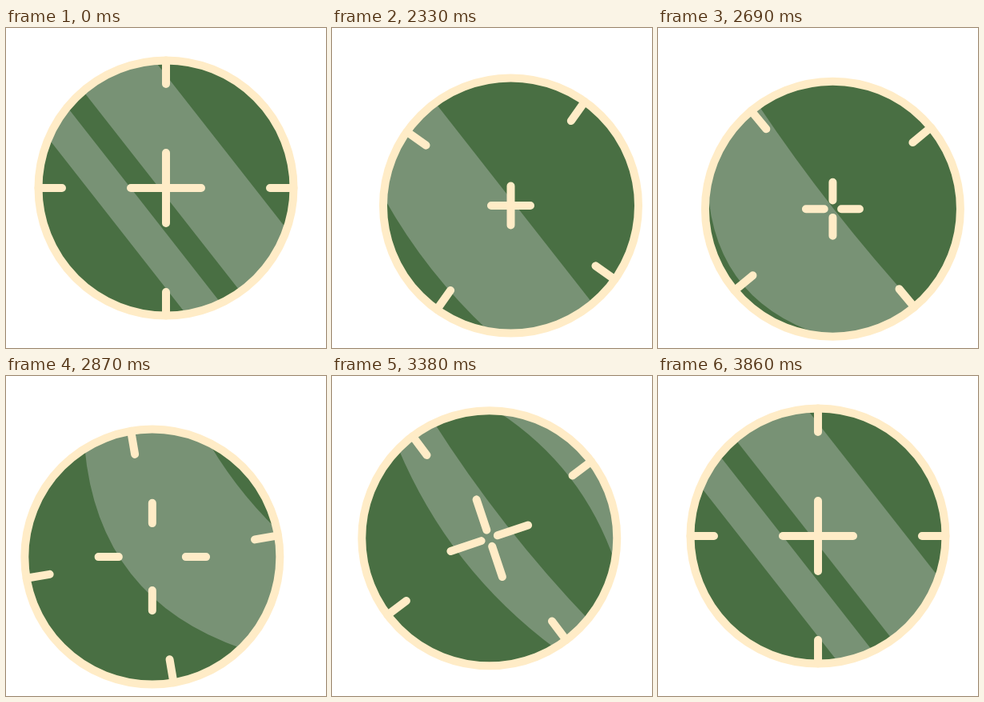
An HTML page that plays this animation: 400x400 px, repeating every 3950 ms.

```html
<!DOCTYPE html>
<html lang="en">
<head>
<meta charset="utf-8">
<title>Scope</title>
<style>
  html, body { margin: 0; width: 100%; height: 100%; overflow: hidden; background: #fff; }
  svg { display: block; width: 100vw; height: 100vh; }
  .line { fill: none; stroke: #ffecc7; stroke-width: 10; stroke-linecap: round; }
  .glass { fill: #496f43; }
  .shine { fill: #789275; }
</style>
</head>
<body>
<svg viewBox="0 0 400 400">
  <clipPath id="lens"><circle r="157"/></clipPath>
  <g id="scope">
    <circle class="glass" r="157"/>
    <g clip-path="url(#lens)">
      <g class="shine" transform="rotate(-38.1)">
        <path id="narrow"/>
        <path id="wide"/>
      </g>
    </g>
    <circle class="line" r="159.5"/>
    <path class="line" id="ticks" d="M0-159.5V-130M0 159.5V130M-159.5 0H-130M159.5 0H130"/>
    <path class="line" id="cross"/>
  </g>
</svg>
<script>
const LOOP = 3950, STEP = 30;
const el = id => document.getElementById(id);
const mix = (a, b, p) => a + (b - a) * p;
const bez = (a, b, c, d, s) => {
  const r = 1 - s;
  return r * r * r * a + 3 * r * r * s * b + 3 * r * s * s * c + s * s * s * d;
};

// cubic-bezier timing, solved by bisection
function ease([x1, y1, x2, y2], x) {
  if (x <= 0) return 0;
  if (x >= 1) return 1;
  let lo = 0, hi = 1;
  for (let i = 0; i < 30; i++) {
    const s = (lo + hi) / 2;
    if (bez(0, x1, x2, 1, s) < x) lo = s; else hi = s;
  }
  return bez(0, y1, y2, 1, lo);
}

// Each leg: x and y of the curved path, tick spin, cross turn, cross inner and outer reach
const legs = [
  { from: 2000, to: 2500, timing: [.167, .167, .45, 1],
    x: [200, 212, 225.1, 223.5], y: [200, 212, 218.3, 224],
    spin: [0, 40], turn: [0, 0], inner: [0, 0], outer: [44, 22] },
  { from: 2500, to: 3000, timing: [.55, 0, .63, 1],
    x: [223.5, 222, 183, 175.5], y: [224, 228.5, 228.5, 224],
    spin: [40, 90], turn: [0, 0], inner: [0, 52], outer: [22, 78] },
  { from: 3000, to: 3870, timing: [.28, 0, .07, 1],
    x: [175.5, 171, 199.7, 200], y: [224, 220, 201.3, 200],
    spin: [90, 270], turn: [0, 90], inner: [52, 0], outer: [78, 44] }
];

// Shine edges: offset at the ends and bulge in the middle, at these times
const times = [2000, 2330, 2690, 2870, 3170, 3380, 3860];
const edges = {
  wideRight:   { at: [87, 5, 7, 164, 240, 230, 87],            bulge: [0, 0, -6, -25, 0, 0, 0] },
  wideLeft:    { at: [-6.7, -108, -72, 18, 150, 89, -6.7],     bulge: [0, -19, -75, -52, 37, 37, 0] },
  narrowRight: { at: [-34.8, -165, -165, -165, 70, 35, -34.8], bulge: [0, 0, 0, 0, -10, -8, 0] },
  narrowLeft:  { at: [-77.5, -200, -200, -200, 0, -20, -77.5], bulge: [0, 0, 0, 0, -25, -22, 0] }
};

// smooth curve through the keys without overshoot
function track(keys, t) {
  const last = times.length - 1;
  if (t <= times[0]) return keys[0];
  if (t >= times[last]) return keys[last];
  const slope = i => (keys[i + 1] - keys[i]) / (times[i + 1] - times[i]);
  const tangent = i => {
    if (i === 0 || i === last) return 0;
    const a = slope(i - 1), b = slope(i);
    return a * b > 0 ? 2 * a * b / (a + b) : 0;
  };
  const i = times.findIndex(k => k > t) - 1;
  const d = times[i + 1] - times[i];
  return bez(keys[i], keys[i] + tangent(i) * d / 3,
             keys[i + 1] - tangent(i + 1) * d / 3, keys[i + 1], (t - times[i]) / d);
}

function band(left, right, t) {
  const [l, lb, r, rb] = [left.at, left.bulge, right.at, right.bulge].map(k => track(k, t));
  return `M${l}-160Q${l + 2 * lb} 0 ${l} 160H${r}Q${r + 2 * rb} 0 ${r}-160Z`;
}

function draw(t) {
  const leg = legs.find(l => t < l.to) || legs[2];
  const p = ease(leg.timing, (t - leg.from) / (leg.to - leg.from));
  const val = name => mix(...leg[name], p);
  const i = val('inner'), o = val('outer');

  el('scope').setAttribute('transform', `translate(${bez(...leg.x, p)} ${bez(...leg.y, p)})`);
  el('ticks').setAttribute('transform', `rotate(${val('spin')})`);
  el('cross').setAttribute('transform', `rotate(${val('turn')})`);
  el('cross').setAttribute('d', `M0 ${-i}V${-o}M0 ${i}V${o}M${-i} 0H${-o}M${i} 0H${o}`);
  el('wide').setAttribute('d', band(edges.wideLeft, edges.wideRight, t));
  el('narrow').setAttribute('d', band(edges.narrowLeft, edges.narrowRight, t));
}

function frame() {
  const t = performance.now() % LOOP;
  draw(Math.floor((t - 19) / STEP) * STEP + 20);
  requestAnimationFrame(frame);
}
frame();
</script>
</body>
</html>
```
